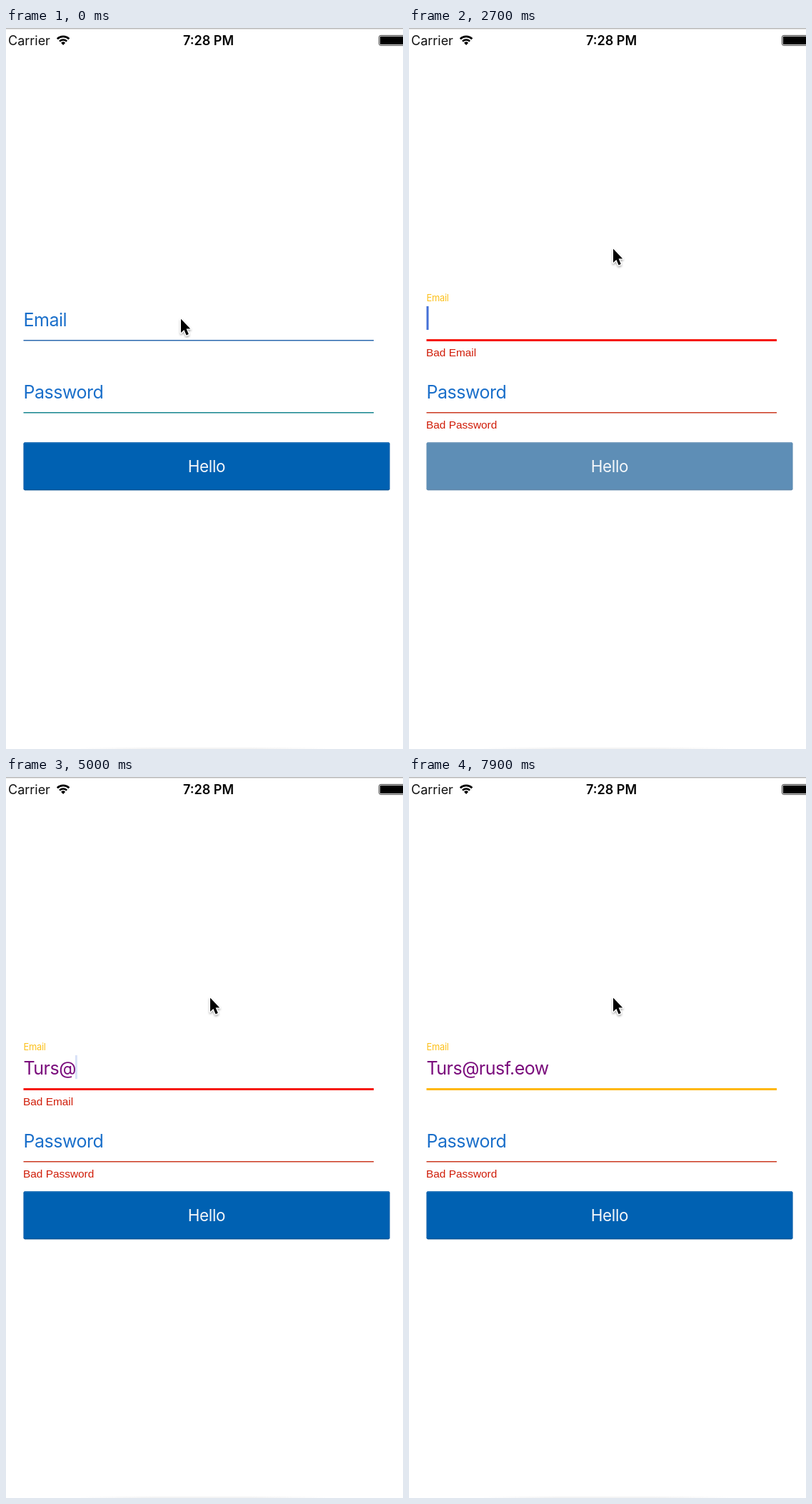
Write an HTML page that moves like this. It is 556x1008 px and loops after 8000 ms.

```html
<!DOCTYPE html>
<html lang="en">
<head>
<meta charset="utf-8">
<title>Login form</title>
<style>
  html, body { margin: 0; width: 100%; height: 100%; overflow: hidden; background: #fff; }
  svg { display: block; width: 556px; height: 1008px; }
  text { font-family: Inter, Roboto, sans-serif; white-space: pre; }
  .field { font-size: 25px; letter-spacing: -.02em; }
  .status { font-size: 18px; }
  .hint { fill: #1a6fca; }
  .error { font: 15.4px "Liberation Sans", Arial, sans-serif; fill: #d01c08; }
</style>
</head>
<body>
<svg viewBox="0 0 556 1008">
  <defs>
    <filter id="soft" x="-50%" y="-50%" width="200%" height="200%">
      <feDropShadow dx="6" dy="6" stdDeviation="2.5" flood-color="#000" flood-opacity=".32"/>
    </filter>
    <filter id="lift" x="-50%" y="-50%" width="200%" height="200%">
      <feDropShadow dx="0" dy="2" stdDeviation="1.5" flood-color="#000" flood-opacity=".35"/>
    </filter>
    <radialGradient id="pad">
      <stop offset=".7" stop-color="#c9c9c9"/>
      <stop offset=".9" stop-color="#cecece"/>
      <stop offset="1" stop-color="#c4c4c4"/>
    </radialGradient>
    <linearGradient id="edge">
      <stop offset="0" stop-color="#fff"/>
      <stop offset=".3" stop-color="#f4f4f4"/>
      <stop offset=".7" stop-color="#f4f4f4"/>
      <stop offset="1" stop-color="#fff"/>
    </linearGradient>
  </defs>

  <rect width="556" height="1.5" fill="#b9b9b9"/>
  <rect x="100" y="1006" width="350" height="2" fill="url(#edge)"/>

  <text class="status" x="3" y="23.5" fill="#111">Carrier</text>
  <g fill="none" stroke="#000" stroke-width="2.6">
    <path d="M71.8 15.2a12 12 0 0 1 16.6 0M75 18.6a7.4 7.4 0 0 1 10.2 0"/>
    <path d="M80.1 24l-3-3.2a4.3 4.3 0 0 1 6 0z" fill="#000" stroke="none"/>
  </g>
  <text class="status" x="283.5" y="23.5" text-anchor="middle" font-weight="600">7:28 PM</text>
  <rect x="522.4" y="10.4" width="50" height="14" rx="2.5" fill="#fff" stroke="#111" stroke-width=".8"/>
  <rect x="523.8" y="11.8" width="46" height="11.2" rx="1"/>

  <text id="label" class="field">Email</text>
  <text id="typed" class="field" x="24.5" y="415.5" fill="#7a0c7c"></text>
  <rect id="caret" y="389" width="3" height="33" fill="#4470d6"/>
  <rect id="emailLine" x="24.5" width="490.5"/>
  <text id="emailError" class="error" x="24" y="459">Bad Email</text>

  <text class="field hint" x="24.5" y="517.5">Password</text>
  <rect id="passLine" x="24.5" y="537" width="490.5" height="1.5"/>
  <text id="passError" class="error" x="24" y="560">Bad Password</text>

  <rect x="24.5" y="579.3" width="513" height="67" rx="2" fill="#bbb"/>
  <g id="active">
    <rect x="24.5" y="579.3" width="513" height="67" rx="2" fill="#0061b2"/>
    <path d="M26 580h510" stroke="#2a78bd"/>
    <path d="M26 645.7h510" stroke="#0a4f8f"/>
  </g>
  <text x="281" y="621" text-anchor="middle" font-size="22.4" letter-spacing="-.3" fill="#f4f7fa">Hello</text>

  <g id="touches" fill="url(#pad)" stroke="#989898" stroke-width="1.3" filter="url(#soft)">
    <circle cx="286" cy="309" r="30.7"/>
    <circle cx="276" cy="716" r="30.7"/>
  </g>
  <g id="cursor">
    <path d="M0 0V19.3L4.4 15.2 7.6 22.8 10.8 21.4 7.6 13.9H13.2Z" stroke="#fff" stroke-width="2.4"
      stroke-linejoin="round" paint-order="stroke" filter="url(#lift)"/>
  </g>
</svg>
<script>
const LOOP = 8000, FOCUS = 200, FIRST_KEY = 1500, VALID = 6250;
const keys = [
  [FOCUS, ''], [FIRST_KEY, 'E'], [2400, ''],
  [2800, 'T'], [3050, 'Tu'], [3350, 'Tur'], [3650, 'Turs'], [4440, 'Turs@'],
  [5150, 'Turs@r'], [5300, 'Turs@ru'], [5480, 'Turs@rus'], [5650, 'Turs@rusf'],
  [5850, 'Turs@rusf.'], [6050, 'Turs@rusf.e'], [VALID, 'Turs@rusf.eo'], [6400, 'Turs@rusf.eow']
];
const el = {};
document.querySelectorAll('svg > [id]').forEach(node => el[node.id] = node);

const ramp = (t, from, to) => Math.min(1, Math.max(0, (t - from) / (to - from)));
const ease = p => p * p * (3 - 2 * p);
const mix = (a, b, p) => a + (b - a) * p;
const set = (node, attrs) => Object.entries(attrs).forEach(([k, v]) => node.setAttribute(k, v));
const show = (node, on) => set(node, { visibility: on ? 'visible' : 'hidden' });

function caretOpacity(sinceKey) {
  const u = sinceKey % 900;
  return u < 750 ? 1 - ramp(u, 450, 590) : ramp(u, 750, 900);
}

function draw(t) {
  const key = keys.filter(([time]) => time <= t).pop();
  const focused = t >= FOCUS;
  const failed = t >= FIRST_KEY;
  const emailBad = failed && t < VALID;

  const float = ease(ramp(t, FOCUS, FOCUS + 200));
  set(el.label, {
    transform: `translate(24.5 ${mix(416.5, 381.5, float)}) scale(${mix(1, .515, float)})`,
    fill: focused ? '#fcc01c' : '#1a6fca'
  });

  el.typed.textContent = key ? key[1] : '';
  const width = key && key[1] ? el.typed.getComputedTextLength() - 1 : 0;
  set(el.caret, { x: 24.5 + width, opacity: key ? caretOpacity(t - key[0]) : 0 });

  set(el.emailLine, {
    y: focused ? 435 : 436,
    height: focused ? 3 : 1.5,
    fill: emailBad ? '#f6170c' : focused ? '#ffb70a' : '#2b69ae'
  });
  set(el.passLine, { fill: failed ? '#cb3a22' : '#17858f' });
  show(el.emailError, emailBad);
  show(el.passError, failed);

  set(el.active, { opacity: 1 - ramp(t, 2600, 2800) + ramp(t, 4700, 4850) });
  show(el.touches, t >= 3900 && t < 4600);

  const move = ease(ramp(t, 350, 850));
  set(el.cursor, { transform: `translate(${mix(245, 286, move)} ${mix(406.7, 308.7, move)})` });
}

const start = performance.now();
function tick() {
  draw((performance.now() - start) % LOOP);
  requestAnimationFrame(tick);
}
tick();
</script>
</body>
</html>
```
